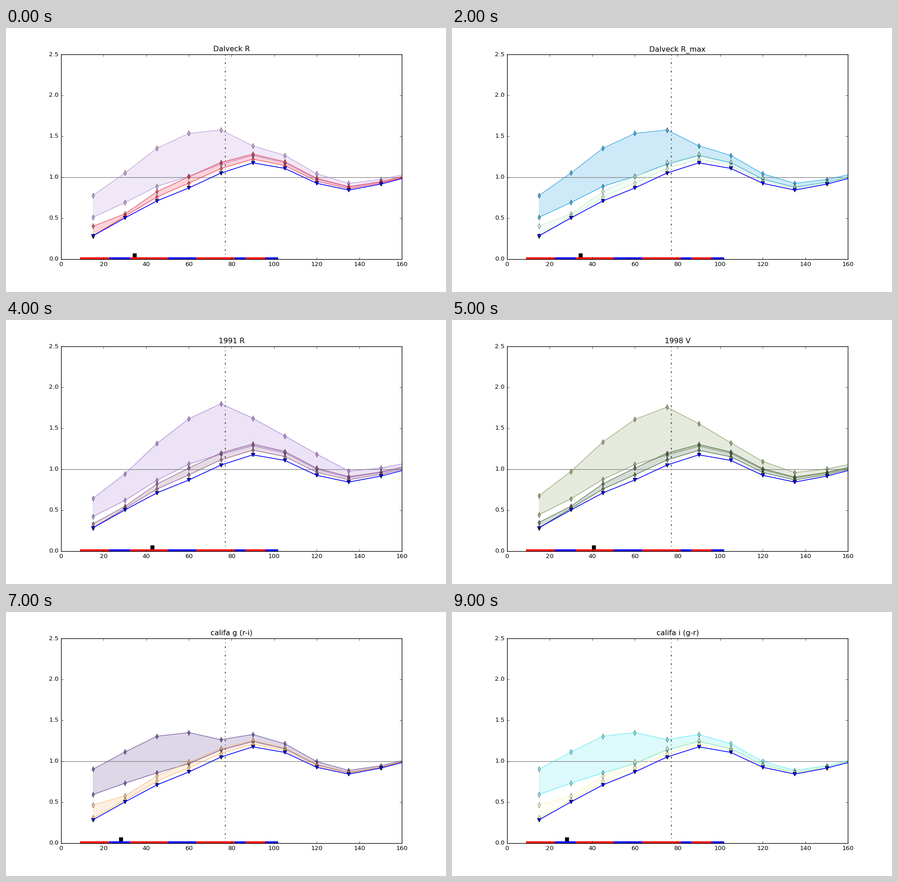
Animation, 966 px wide and 580 px high, one loop 10000 ms. Source, as a matplotlib script:

```python
import matplotlib.pyplot as plt
import numpy as np
from matplotlib.animation import FuncAnimation

plt.style.use("classic")
plt.rcParams.update({
    "font.family": "DejaVu Sans",
    "font.size": 10,
    "savefig.dpi": "figure",
    "figure.facecolor": "white",
    "savefig.facecolor": "white",
})

W, H, DPI = 966, 580, 96
RADII = np.arange(15, 166, 15)
GAS = np.array([0.283, 0.502, 0.710, 0.868, 1.050, 1.175,
                1.107, 0.925, 0.842, 0.915, 1.017])

MASS_RATIO = 1.522   # between the two limits of a band
INNER = 0.517        # strength of the inner band against the outer one

# scale length, stellar term at the first radius
DALVECK = 34.4, 0.777
GALDOZ = 14.0, 1.138
R_1991 = 42.9, 0.643
V_1998 = 40.6, 0.676
CALIFA = 28.0, 0.902

# title, disc, outer colour, inner colour
SCENES = [
    ("Dalveck R", DALVECK, (180, 140, 215), (235, 40, 65)),
    ("Dalveck V", DALVECK, (150, 175, 120), (215, 150, 120)),
    ("Dalveck R_max", DALVECK, (10, 150, 220), (195, 235, 205)),
    ("Galdoz-Ombru J", GALDOZ, (140, 95, 190), (235, 70, 55)),
    ("1991 R", R_1991, (160, 115, 210), (130, 75, 125)),
    ("1998 V", V_1998, (130, 150, 90), (50, 85, 50)),
    ("califa g (g-i)", CALIFA, (120, 160, 200), (220, 160, 150)),
    ("califa g (r-i)", CALIFA, (90, 58, 140), (248, 182, 110)),
    ("califa r (g-i)", CALIFA, (150, 190, 150), (230, 170, 190)),
    ("califa i (g-r)", CALIFA, (80, 230, 240), (245, 245, 190)),
]

ARMS = [8.9, 22.3, 32.4, 49.8, 63.4, 81.2, 86.5, 95.6, 101.8]

fig = plt.figure(figsize=(W / DPI, H / DPI), dpi=DPI)
ax = fig.add_axes([0.125, 0.125, 0.775, 0.775])


def instability(disc, mass, weight):
    """Stars lead where their term is the larger one, gas elsewhere."""
    length, start = disc
    x = (RADII - 15) / 15
    core = np.minimum(x, 4)
    disk = start * np.exp(-0.93 * (RADII - 15) / length)
    stars = disk * (1 + 0.6 * core + 0.43 * core**2 + 2.55 * (x - core))
    coupling = 3.5 * x**2 / (x**2 + 18)
    return np.maximum(stars * weight * mass,
                      GAS + disk * coupling * weight * mass**2)


def draw_band(disc, weight, rgb):
    color = [c / 255 for c in rgb]
    limits = [instability(disc, m, weight) for m in (1, 1 / MASS_RATIO)]
    ax.fill_between(RADII, *limits, color=color, alpha=0.2)
    for edge in limits:
        ax.plot(RADII, edge, "d-", color=color, alpha=0.7)


def draw(i):
    title, disc, outer, inner = SCENES[i]
    ax.cla()
    ax.axhline(1, color="gray")
    ax.axvline(77, color="k", ls="-.")
    for weight, rgb in ((1, outer), (INNER, inner)):
        draw_band(disc, weight, rgb)
        ax.plot(RADII, GAS, "v-", color="b", zorder=2.1)
    for k, span in enumerate(zip(ARMS, ARMS[1:])):
        ax.plot(span, (0, 0), color="rb"[k % 2], lw=7,
                solid_capstyle="butt")
    ax.plot(disc[0], 0.05, "ks")
    ax.set_title(title)
    ax.set_xlim(0, 160)
    ax.set_ylim(0, 2.5)
    return []


anim = FuncAnimation(fig, draw, frames=len(SCENES), interval=1000,
                     init_func=lambda: draw(0), repeat=True, repeat_delay=0)
plt.show()
```
